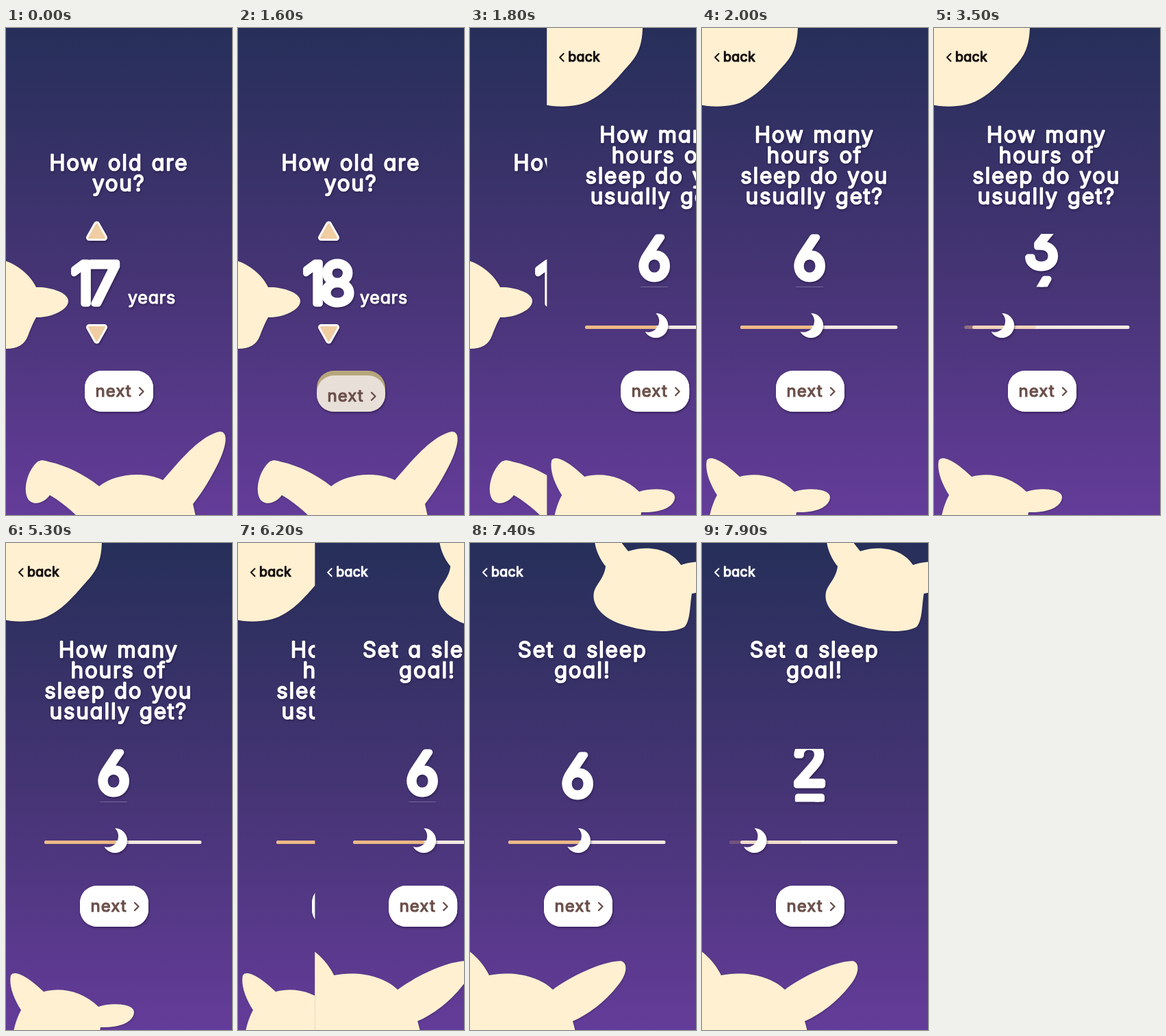
Recreate the animation shown at these times as an HTML page. Size 330 px wide and 712 px high, loop 8 s.

```html
<!DOCTYPE html>
<html lang="en">
<head>
<meta charset="utf-8">
<title>Sleep setup</title>
<style>
  html, body { margin: 0; width: 100%; height: 100%; overflow: hidden; background: #272f5a; }
  svg { display: block; width: 100vw; height: 100vh; }
  text {
    font-family: Inter, sans-serif; font-weight: 400;
    font-feature-settings: "cv02", "cv03", "cv09", "cv11";
    fill: #fff; stroke: #fff; stroke-width: 1.2; stroke-linejoin: round;
  }
  .title {
    font-size: 31px; font-weight: 300; stroke-width: 2.4;
    letter-spacing: 2.2px; word-spacing: 2px; text-anchor: middle;
  }
  .number { font-size: 82px; font-weight: 300; stroke-width: 9; }
  .dial { text-anchor: middle; }
  .years { font-size: 25px; letter-spacing: .8px; }
  .next { font-size: 24px; letter-spacing: 1px; fill: #6b4f4a; stroke: #6b4f4a; }
  .back { font-size: 19.5px; letter-spacing: .3px; }
  .dark { fill: #15100f; stroke: #15100f; }
  .chevron { fill: none; stroke: #fff; stroke-width: 2; stroke-linecap: round; stroke-linejoin: round; }
  .chevron.dark { fill: none; stroke: #15100f; }
  .chevron.brown { stroke: #6b4f4a; stroke-width: 2.4; }
  .cream { fill: #fef0d1; filter: drop-shadow(1px 1px 1px rgba(30, 15, 55, .3)); }
  .arrow { fill: #f0cda2; stroke: #f0cda2; stroke-width: 3; stroke-linejoin: round; }
  .arrow.rim { stroke: #fff; stroke-width: 9; }
  .bar { stroke-width: 5; stroke-linecap: round; }
  .soft { filter: drop-shadow(1px 2px 1.5px rgba(30, 15, 55, .5)); }
</style>
</head>
<body>
<svg id="stage" viewBox="0 0 330 712" preserveAspectRatio="none"></svg>
<script>
const LOOP = 8000, STEP = 100;
const DIGIT_PITCH = 77, HOUR_WIDTH = 21.5;

const stage = document.getElementById("stage");
const $ = id => document.getElementById(id);

const title = (lines, x, y) => `<g class="soft">${lines.map((line, i) =>
  `<text class="title" x="${x}" y="${y + i * 30}">${line}</text>`).join("")}</g>`;

const blobs = (...paths) => paths.map(d => `<path class="cream" d="${d}"/>`).join("");

const arrow = d => `<g class="soft"><path class="arrow rim" d="${d}"/><path class="arrow" d="${d}"/></g>`;

const back = tone => `
  <path class="chevron ${tone}" d="M24.5 37.5L19 43l5.5 5.5"/>
  <text class="back ${tone}" x="31" y="49">back</text>`;

const button = (id, x) => `
  <g class="soft"><rect id="${id}Base" x="${x}" y="501" width="100" height="60" rx="25"/>
  <rect id="${id}Face" x="${x}" width="100" rx="25"/></g>
  <g id="${id}Label">
    <text class="next" x="${x + 15.5}" y="539">next</text>
    <path class="chevron brown" d="M${x + 80} 526l5.5 5.5l-5.5 5.5"/>
  </g>`;

const dial = id => `
  <g class="soft"><g clip-path="url(#dialWindow)"><g id="${id}Digits">
    ${[1, 2, 3, 4, 5, 6, 7].map(n =>
      `<text class="number dial" x="157" y="${366 + (n - 6) * DIGIT_PITCH}">${n}</text>`).join("")}
  </g></g></g>
  <path class="bar" stroke="#f3e8e2" d="M58.5 437.5H283"/>
  <path class="bar" id="${id}Fill" stroke="#edb986" d="M58.5 437.5H158"/>
  <g id="${id}Moon"><path class="soft" fill="#fff"
    d="M159 417A18 18 0 1 1 143.5 444A16 16 0 0 0 159 417Z"/></g>`;

const screen = (id, content) => `
  <g id="${id}" clip-path="url(#frame)"><rect width="330" height="712" fill="url(#night)"/>${content}</g>`;

stage.innerHTML = `
  <defs>
    <linearGradient id="night" x2="0" y2="1">
      <stop stop-color="#262f59"/><stop offset=".5" stop-color="#453474"/>
      <stop offset="1" stop-color="#643c99"/>
    </linearGradient>
    <clipPath id="dialWindow"><rect x="110" y="301" width="94" height="77.5"/></clipPath>
    <clipPath id="frame"><rect width="330" height="712"/></clipPath>
  </defs>` +
  screen("age",
    blobs(
      "M-5 339C18 346 36 362 44 379C62 378 91 386 91 399C91 413 64 424 44 423C38 434 36 440 32 450C27 464 15 470-5 469Z",
      "M104 714C90 700 76 690 64 683C54 696 40 698 33 690C24 678 30 650 44 636C50 630 56 632 62 634C90 640 116 654 136 670C160 651 202 648 229 661C254 632 284 596 312 590C326 590 321 612 311 634C301 655 286 680 273 696L277 714Z") +
    title(["How old are", "you?"], 165, 208) +
    arrow("M132.5 287L143.500 306.500H121.500Z") + arrow("M132.500 457L143.500 437.500H121.500Z") +
    `<g class="soft"><text class="number" id="years" x="95" y="403" letter-spacing="-7"></text></g>
    <text class="years soft" x="178" y="403">years</text>` +
    button("ageNext", 115)) +
  screen("hours",
    blobs(
      "M-5-5H140C140 36 126 47 110 65C90 88 72 106 47 112C28 116 10 115-5 112Z",
      "M11 714C14 700 18 690 22 683C10 664 4 645 7 632C12 624 30 632 55 656C80 649 112 655 135 678C150 672 187 672 187 686C186 702 163 709 138 708L137 714Z") +
    back("dark") +
    title(["How many", "hours of", "sleep do you", "usually get?"], 164.5, 167) +
    dial("hours") + button("hoursNext", 108)) +
  screen("goal",
    blobs(
      "M182-2C184 12 190 24 198 34C196 52 184 60 181 72C177 92 195 112 228 121C262 131 300 132 314 122C322 112 321 90 324 74L335 72V27C322 28 314 30 308 32C294 10 262 2 231 12L220-2Z",
      "M-2 596C10 605 20 616 28 632C60 625 100 632 121 653C145 635 190 612 220 611C232 614 229 632 215 648C198 670 172 690 150 699L154 714H-2Z") +
    back("") + title(["Set a sleep", "goal!"], 164.5, 167) +
    dial("goal") + button("goalNext", 108));

const clamp = x => Math.min(1, Math.max(0, x));
const smooth = x => x * x * (3 - 2 * x);

// Eased value through [time, value] stops.
function track(t, stops) {
  let value = stops[0][1];
  for (let i = 1; i < stops.length; i++) {
    const [t0, a] = stops[i - 1], [t1, b] = stops[i];
    if (t >= t0) value = a + (b - a) * smooth(clamp((t - t0) / (t1 - t0)));
  }
  return value;
}

function setButton(id, pressed) {
  $(id + "Base").setAttribute("fill", pressed ? "#b7a67c" : "#fff");
  const face = $(id + "Face");
  face.setAttribute("fill", pressed ? "#e8e0d8" : "#fff");
  face.setAttribute("y", pressed ? 508 : 501);
  face.setAttribute("height", pressed ? 53 : 60);
  $(id + "Label").setAttribute("transform", `translate(0 ${pressed ? 7 : 0})`);
}

function setDial(id, value) {
  const below = 6 - value;
  $(id + "Digits").setAttribute("transform", `translate(0 ${below * DIGIT_PITCH})`);
  $(id + "Moon").setAttribute("transform", `translate(${-below * HOUR_WIDTH} 0)`);
  $(id + "Fill").setAttribute("transform", `translate(${-below * 4.2} 0)`);
  $(id + "Fill").setAttribute("opacity", clamp(1 - below / 5));
}

// Screens slide in from the right with an ease-out.
function slideIn(id, t, start) {
  const x = 330 * Math.pow(1 - clamp((t - start) / 300), 1.65);
  $(id).setAttribute("transform", `translate(${x} 0)`);
}

function draw(now) {
  const t = Math.floor(now % LOOP / STEP) * STEP;
  $("years").textContent = t < 900 ? "17" : "18";
  setButton("ageNext", t >= 1600 && t < 1700);
  setButton("hoursNext", t >= 6000 && t < 6100);
  setButton("goalNext", false);
  slideIn("hours", t, 1656);
  slideIn("goal", t, 6056);
  setDial("hours", track(t, [[3050, 6], [3850, 1.3], [4400, 5.16], [4800, 4.5], [5300, 6]]));
  setDial("goal", track(t, [[7350, 6], [8150, 1]]));
  requestAnimationFrame(draw);
}
requestAnimationFrame(draw);
</script>
</body>
</html>
```
